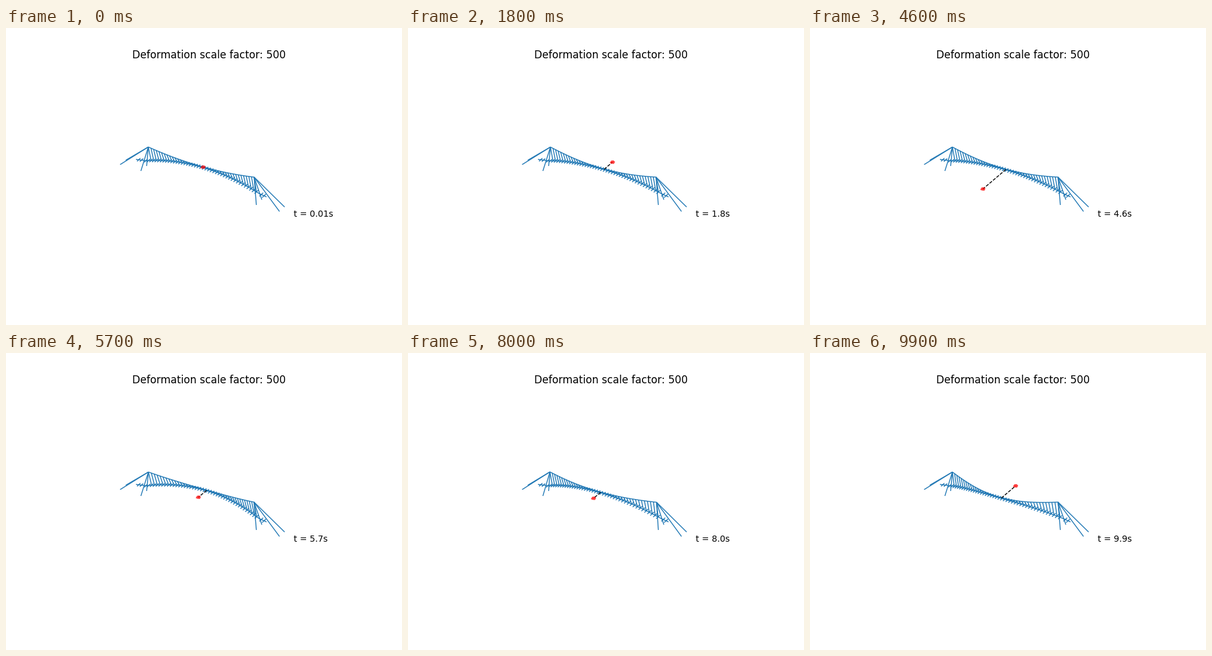
Recreate the animation shown at these times as a matplotlib script. Size 640 px wide and 480 px high, loop 10 s.

```python
import numpy as np
import matplotlib.pyplot as plt
from matplotlib.animation import FuncAnimation
from matplotlib.collections import LineCollection
from matplotlib.patches import Polygon

FRAMES, INTERVAL = 100, 100
BLUE = "#1f77b4"
N = 43                                   # deck panels between the pylons
SIDE = np.array([1.0, -0.85])            # lateral axis on screen
DOWN = np.array([0.0, 1.0])
MID = np.array([318.5, 225.0])

# Pylon tops, leg feet and back-stay anchors
TOPS = np.array([[230, 192.3], [401, 241]])
FEET = np.array([[[218, 231], [227.3, 223]], [[404.6, 286], [413.5, 277.5]]])
ANCHORS = np.array([[[184.5, 220.7], [193.5, 213.7]], [[442, 296.5], [450.3, 289.3]]])

# Times of the positive swings of the hanging mass
PEAKS = [0.5, 2.07, 3.7, 5.28, 6.8, 8.55, 10.22]


def arch(a, b, rise, u):
    """Parabola from a to b, bulging upward by rise."""
    u = np.asarray(u)[:, None]
    return (1 - u) * a + u * b - 4 * rise * u * (1 - u) * DOWN


def motion(t):
    """Swing of the mass, lateral and vertical movement of midspan."""
    cycle = np.interp(t, PEAKS, range(len(PEAKS))) if t > PEAKS[0] else (t - 0.5) / 1.6
    phase = 2 * np.pi * cycle
    amp = np.interp(t, [0, 1.8, 2.9, 4.5, 5.3, 6.8, 8.5, 9.9],
                    [0, 25, 33.5, 43, 45, 52, 46, 38])
    heave = np.interp(t, [0, 1.8, 3, 4.6, 6.8, 8, 9.9], [0, 2, 5, 2, 1.5, -6, 1.5])
    return amp * np.cos(phase), t * np.sin(phase), heave


def bridge(sway, heave):
    shift = sway * SIDE + heave * DOWN
    tops = TOPS + np.array([[0.1, 0.03], [-0.1, -0.03]]) * heave

    u = np.linspace(0, 1, N + 1)
    deck = arch(np.array([226, 214.5]), np.array([409, 267.5]), 15.7, u)
    deck += np.sin(np.pi * u)[:, None] * shift

    v = np.linspace(0, 1, N - 2)
    cable = arch(tops[0], tops[1], -7, v)
    cable += np.sin(np.pi * v)[:, None] * shift

    full = np.vstack([[210, 212.3], deck, [421, 273]])
    lines = [full, cable]
    lines += [np.array(pair) for pair in zip(cable, deck[2:-1])]

    beams = np.vstack([[214.5, 212.9], [219, 213.5], deck[:-1],
                       [412.5, 269.2], [417, 271.2]])
    for p in beams:
        half = np.array([2.7, -2.5]) * (1 + 0.15 * (p[0] - 215) / 200)
        lines.append(np.array([p - half, p + half]))

    for top, feet, anchors in zip(tops, FEET, ANCHORS):
        lines += [np.array([top, end]) for end in (*feet, *anchors)]
    return lines


fig = plt.figure(figsize=(6.4, 4.8), dpi=100)
ax = fig.add_axes([0, 0, 1, 1])
ax.set_xlim(0, 640)
ax.set_ylim(480, 0)
ax.axis("off")

ax.text(328, 49.3, "Deformation scale factor: 500", fontsize=12, ha="center")
clock = ax.text(465, 305, "", fontsize=10)
frame_lines = LineCollection([], colors=BLUE, linewidths=1)
ax.add_collection(frame_lines)
rod, = ax.plot([], [], "k--", lw=1, zorder=3)
BLOCK = np.array([[-4.2, 1], [-2, -2.6], [1.8, -3], [4.3, -0.8], [2.6, 2.6], [-1.5, 2.3]])
mass = Polygon(BLOCK, facecolor="red", edgecolor="none", alpha=0.75, zorder=4)
ax.add_patch(mass)


def draw(i):
    t = i / 10 if i else 0.01
    swing, sway, heave = motion(t)
    pivot = MID + sway * SIDE + heave * DOWN
    bob = MID + swing * SIDE + heave * DOWN
    frame_lines.set_segments(bridge(sway, heave))
    rod.set_data(*np.array([pivot, bob]).T)
    mass.set_xy(BLOCK + bob)
    clock.set_text(f"t = {t}s")
    return frame_lines, rod, mass, clock


anim = FuncAnimation(fig, draw, frames=FRAMES, interval=INTERVAL, repeat=True, repeat_delay=0)
plt.show()
```
